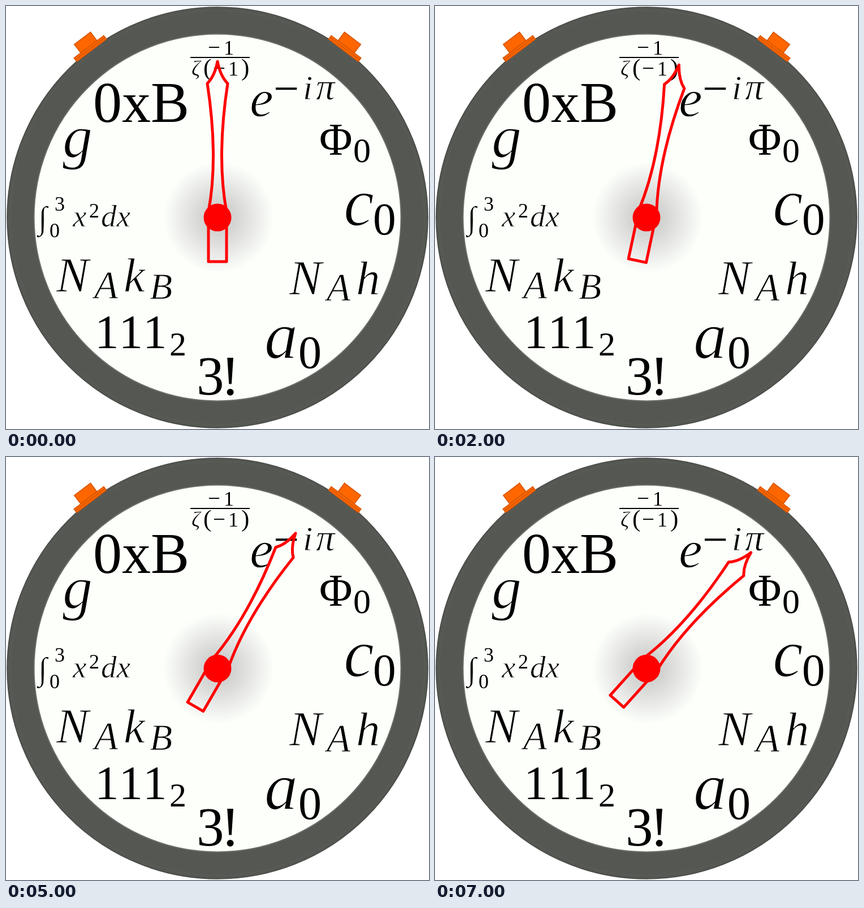
These frames come from a looping animation (748x748 px, 8000 ms). An HTML page:

```html
<!DOCTYPE html>
<html lang="en">
<head>
<meta charset="utf-8">
<title>Stopwatch</title>
<style>
  html, body { margin: 0; width: 100%; height: 100%; overflow: hidden; background: #fff; }
  svg { display: block; width: 100%; height: 100%; }
  text { font-family: "Liberation Serif", "Noto Serif", serif; font-kerning: none; }
  /* a face-coloured outline thins the heavy italic strokes */
  .it { font-style: italic; stroke: #fcfffa; stroke-width: .014em; }
</style>
</head>
<body>
<svg viewBox="0 0 748 748">
  <defs>
    <radialGradient id="shade">
      <stop offset="0" stop-color="#c4c5c3"/>
      <stop offset=".3" stop-color="#d4d5d3"/>
      <stop offset=".7" stop-color="#ecedeb"/>
      <stop offset="1" stop-color="#fcfffa"/>
    </radialGradient>
    <g id="button" fill="#f60" stroke="#d45500" stroke-width="1.5">
      <path d="M-18-378V-397H18V-378Z"/>
      <path d="M-33-370V-378H33V-370ZM-33-374H33"/>
    </g>
  </defs>

  <g transform="translate(374 374)">
    <circle r="372" fill="#555753" stroke="#454743" stroke-width="1.5"/>
    <circle r="366" fill="none" stroke="#5d5f5b"/>
    <circle r="324.5" fill="#fcfffa" stroke="#696b67" stroke-width="2"/>
    <circle cx="2" r="98" fill="url(#shade)"/>
    <use href="#button" transform="rotate(-37)"/>
    <use href="#button" transform="rotate(37)"/>
  </g>

  <g id="labels"></g>
  <path d="M326 91H431" stroke="#000" stroke-width="2"/>

  <g transform="translate(374 374)">
    <path id="hand" fill="none" stroke="red" stroke-width="5" stroke-linejoin="round"
      d="M0-276Q-5-250-18-237C-7-165-2-85-16-10V78H16V-10C2-85 7-165 18-237Q5-250 0-276Z"/>
    <circle r="24.5" fill="red"/>
  </g>
</svg>
<script>
  // text, x, baseline, size
  const upright = [
    ["−", 357, 86, 39], ["1", 385, 86, 36],
    ["(", 349, 123, 43], ["−", 366, 123, 39], ["1", 393, 123, 36], [")", 416, 123, 43],
    ["0xB", 154, 205, 102], ["−", 473, 173, 80],
    ["Φ", 554, 263, 80], ["0", 614, 276, 62],
    ["0", 649, 404, 81], ["0", 517, 640, 82],
    ["3", 337, 687, 97], ["!", 380, 687, 100],
    ["111", 157, 605, 85], ["2", 289, 618, 60],
    ["3", 86, 362, 36], ["0", 77, 409, 36], ["2", 147, 374, 36]
  ];
  const italic = [
    ["ζ", 328, 123, 38], ["e", 431, 195, 94], ["i", 525, 165, 62], ["π", 548, 165, 67],
    ["c", 597, 388, 121], ["N", 501, 510, 86], ["A", 567, 521, 69], ["h", 619, 510, 85],
    ["a", 457, 623, 118], ["N", 89, 505, 86], ["A", 156, 517, 69], ["k", 208, 505, 85],
    ["B", 254, 518, 66], ["∫", 57, 394, 57], ["x", 118, 390, 55], ["dx", 168, 390, 55],
    ["g", 100, 267, 106]
  ];
  const markup = (list, style) => list.map(([label, x, y, size]) =>
    `<text class="${style}" x="${x}" y="${y}" font-size="${size}">${label}</text>`).join("");
  document.getElementById("labels").innerHTML = markup(upright, "") + markup(italic, "it");

  const hand = document.getElementById("hand");
  function draw(now) {
    const second = Math.floor(now / 1000) % 8;
    hand.setAttribute("transform", `rotate(${second * 6})`);
    requestAnimationFrame(draw);
  }
  draw(performance.now());
</script>
</body>
</html>
```
